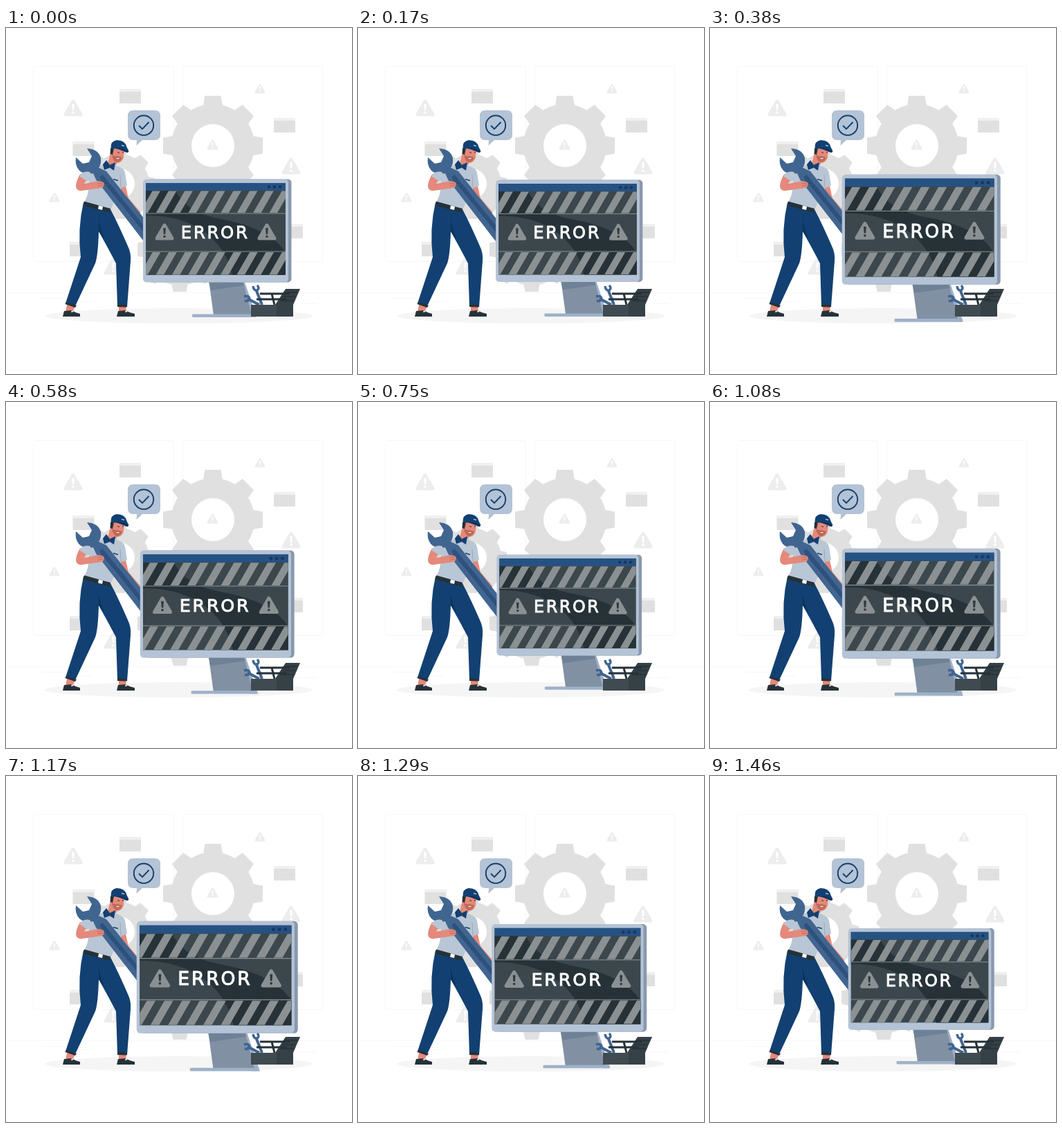
Write an HTML page that moves like this. It is 500 px wide and 500 px high and loops after 1.5 s.

```html
<!DOCTYPE html>
<html lang="en">
<head>
<meta charset="utf-8">
<title>Error repair</title>
<style>
html, body { margin: 0; width: 100%; height: 100%; overflow: hidden; background: #fff; }
svg { display: block; width: 100%; height: 100%; }
</style>
</head>
<body>
<svg viewBox="0 0 500 500">
  <defs>
    <clipPath id="bands"><path d="M202 235.500H404V267H202ZM202 324H404V356.500H202Z"/></clipPath>
  </defs>

  <g fill="none" stroke="#f7f7f7">
    <rect x="39.500" y="55.500" width="203" height="282" rx="3"/>
    <rect x="255" y="55.500" width="203" height="282" rx="3"/>
    <path d="M0 382.500H500"/>
    <path d="M416 398.500H449M52 390.500H85M105 395.500H126"/>
  </g>
  <g id="backdrop"></g>
  <ellipse cx="249.500" cy="416" rx="193" ry="11" fill="#f5f5f5"/>

  <g id="bubble">
    <path fill="#b4c3d5" d="M184 119H215Q223 119 223 127V154Q223 162 215 162H197L188.500 170L189 162H184Q176 162 176 154V127Q176 119 184 119Z"/>
    <g fill="none" stroke="#124072" stroke-width="1.900">
      <circle cx="199" cy="140.700" r="14.200"/>
      <path d="M192 141L197 146L206.500 136"/>
    </g>
  </g>

  <g id="worker">
    <path fill="none" stroke="#e4897b" stroke-width="8" stroke-linecap="round" d="M169.500 231L173 247L190 267"/>
    <path fill="#e4897b" d="M88 400L100 402L96 411H86ZM163 401H174L173 411H163Z"/>
    <path fill="#263238" d="M84 409L95 408Q101 412 107 413V417H82ZM162 409L173 408Q179 412 186 413V417H160Z"/>
    <path fill="#fff" d="M95 408L98 410L94 411ZM173 408L176 410L172 411Z"/>
    <path fill="#124072" d="M112 252L151 262Q163 285 176 315Q181 325 180 337L175 403L161 402L159 340Q147 317 134 294Q133 329 129 340L100 402L86 398L108 331Q103 290 112 252Z"/>
    <path fill="#0d3159" d="M134 276Q135 290 143 305L134 294Z"/>
    <path fill="#263238" d="M87 396L102 401L100 404L85.500 399ZM161 399L175 400L174 403.500L161 403Z"/>

    <path fill="#b9c6d5" d="M121 210Q133 199 147 195L160 199Q171 203 172 209L175 228L165 232L151 263L113 252Q120 240 120 224Z"/>
    <path fill="none" stroke="#9babbd" d="M165 212L166 231"/>
    <path fill="#263238" d="M113 250.500L151 261L150 267L111.500 256.500Z"/>
    <path fill="#fff" d="M134 256.500L140 258L139 263L133 261.500Z"/>
    <path fill="none" stroke="#124072" stroke-width="1.500" d="M155 218.500L162 220.500"/>

    <path fill="#e4897b" d="M151 180L147 196L155 202L161 195Q168 194 170 187L171 176L157 172Z"/>
    <path fill="#bd6a58" d="M153 182L156 185L161 185L168 187Q166 194 160 194Q154 192 153 182Z"/>
    <path fill="#fff" d="M159 188L164 188Q162 190.500 159 188Z"/>
    <path fill="#263238" d="M151 174H156L154 183L150.500 182Z"/>
    <path fill="none" stroke="#263238" d="M161 179.500L164 180.500M168 179.500L170 180"/>
    <path fill="#124072" d="M151.500 174Q151 163 160 162Q172 162 174.500 172L177.500 178Q176 181 172 178.500Q164 174 151.500 174Z"/>
    <path fill="#0d3159" d="M160 174Q171 173 177 179Q175 181 171 178.500Z"/>
    <path fill="none" stroke="#fff" d="M167 169.500L171 170.500"/>
    <path fill="#124072" d="M145 191L150 198L158 194L156 206L150 202L142 205L140 197Z"/>

    <path fill="#406590" d="M117 174Q134 175 137 188Q138 196 134 202L145 207L213 292L202 312L130 219L126 210Q114 213 106 206Q99 198 101 187L111 196L120 194L124 185Z"/>
    <path fill="none" stroke="#2d517c" stroke-width="6" stroke-linecap="round" d="M139 216L212 306"/>

    <path fill="#e4897b" d="M107 211Q101 222 101 229Q102 236 110 235L139 231Q143 228 141 223L134 221L113 225L119 216Z"/>
    <path fill="#b9c6d5" d="M121 208Q111 206 106 214L118 222L126 215Z"/>
    <path fill="none" stroke="#c46a5c" d="M132 225L140 224M133 228L140 227"/>
  </g>

  <g id="monitor">
    <path fill="#9eb1c9" d="M336 364H344L362 418H350Z"/>
    <path fill="#8191a3" d="M293 364H342L355 415H300Z"/>
    <path fill="#6f8196" d="M293 366H342L344 372L296 379Z"/>
    <rect x="269" y="413.500" width="92" height="4.500" rx="1.500" fill="#9eb1c9"/>
    <rect x="204" y="218.500" width="208.500" height="149" rx="5" fill="#8999ad"/>
    <rect x="198" y="218.500" width="210" height="149" rx="5" fill="#b4c3d5"/>
    <rect x="202" y="224" width="202" height="133" fill="#3b474c"/>
    <path fill="#263238" d="M202 235H245C260 264 287 271 310 276C355 284 390 300 404 325V357H327C318 310 275 270 202 271Z"/>
    <path fill="#265283" d="M202 224H404V235H202Z"/>
    <path stroke="#163760" stroke-width="4.500" stroke-linecap="round" d="M380 229.500h.01M388 229.500h.01M396 229.500h.01"/>
    <path id="stripes" fill="#8b9193" clip-path="url(#bands)"/>
    <path stroke="#879194" d="M202 268H404M202 323H404"/>
    <g id="signs"></g>
    <text x="252.800" y="303.600" font-family="DejaVu Sans, sans-serif" font-size="24.500" letter-spacing="2.600" fill="#fff" stroke="#fff" stroke-width=".9">ERROR</text>
  </g>

  <g id="toolbox">
    <path fill="#354146" d="M404 377H425L415 400H389Z"/>
    <path fill="none" stroke="#263238" stroke-width="1.500" d="M402 382H421M399 388H418M396 394H416"/>
    <g fill="none" stroke="#406590" stroke-width="3.500">
      <path stroke-width="4" d="M362 380L370 400M349 391L366 400"/>
      <path d="M357 373Q358 380 363 379Q367 376 363 372M344 388Q351 386 352 391Q351 396 345 394"/>
    </g>
    <path fill="none" stroke="#263238" stroke-width="3" d="M367 384H410M362 392H406M384 384L388 400"/>
    <path fill="#3f4b50" d="M354 400H391V417H354Z"/>
    <path fill="#354146" d="M391 400H415V417H391Z"/>
  </g>
</svg>
<script>
const $ = id => document.getElementById(id);

function gear(x, y, body, tip, hole, halfTip) {
  let teeth = '';
  for (let a = 0; a < 360; a += 45)
    teeth += `<path transform="rotate(${a})" d="M${-halfTip} ${-tip}H${halfTip}L${halfTip + 3} ${5 - body}H${-halfTip - 3}Z"/>`;
  return `<g transform="translate(${x} ${y})" fill="#e0e0e0"><circle r="${body}"/>${teeth}<circle r="${hole}" fill="#fff"/></g>`;
}

const card = (x, y) =>
  `<path fill="#e0e0e0" d="M${x} ${y}h31v21h-31z"/><path fill="#f0f0f0" d="M${x} ${y}h31v4h-31z"/>`;

const warning = (x, y, width, fill, mark) =>
  `<g transform="translate(${x} ${y}) scale(${width / 27})">
    <path d="M0-10L11 9H-11Z" fill="${fill}" stroke="${fill}" stroke-width="5" stroke-linejoin="round"/>
    <path d="M-1.800-6H1.800L1.200 3H-1.200Z" fill="${mark}"/><circle cy="6.200" r="1.700" fill="${mark}"/>
  </g>`;

$('backdrop').innerHTML =
  gear(299, 170, 60, 72, 31, 11.5) +
  gear(164, 225, 43, 51, 22, 8) +
  gear(251, 320, 52, 61, 25, 9.5) +
  [[164, 88], [387, 130], [96.5, 164], [398, 283], [92, 309]].map(p => card(...p)).join('') +
  [[97, 116, 27], [367, 88, 15], [412, 200, 27], [70, 245, 15], [155, 345, 27], [298.5, 169, 16]]
    .map(p => warning(...p, '#ededed', '#fff')).join('');

$('signs').innerHTML = [229, 377].map(x => warning(x, 295, 27, '#8b9193', '#30393e')).join('');

let stripes = '';
for (const y of [235, 324])
  for (let x = 211.8; x < 430; x += 23.4) stripes += `M${x} ${y}h11.5l-19 33h-11.5z`;
$('stripes').setAttribute('d', stripes);

// Linear pulse: [time in ms, scale]
const pulse = [[0, 1], [104, .964], [440, 1.09], [787, .964], [1155, 1.092], [1500, .97]];

function scaleAt(t) {
  const i = pulse.findIndex(([end]) => end > t);
  const [t0, s0] = pulse[i - 1], [t1, s1] = pulse[i];
  return s0 + (s1 - s0) * (t - t0) / (t1 - t0);
}

function draw() {
  const s = scaleAt(performance.now() % 1500);
  $('monitor').setAttribute('transform', `translate(305.2 318.5) scale(${s}) translate(-305.2 -318.5)`);
  requestAnimationFrame(draw);
}
draw();
</script>
</body>
</html>
```
